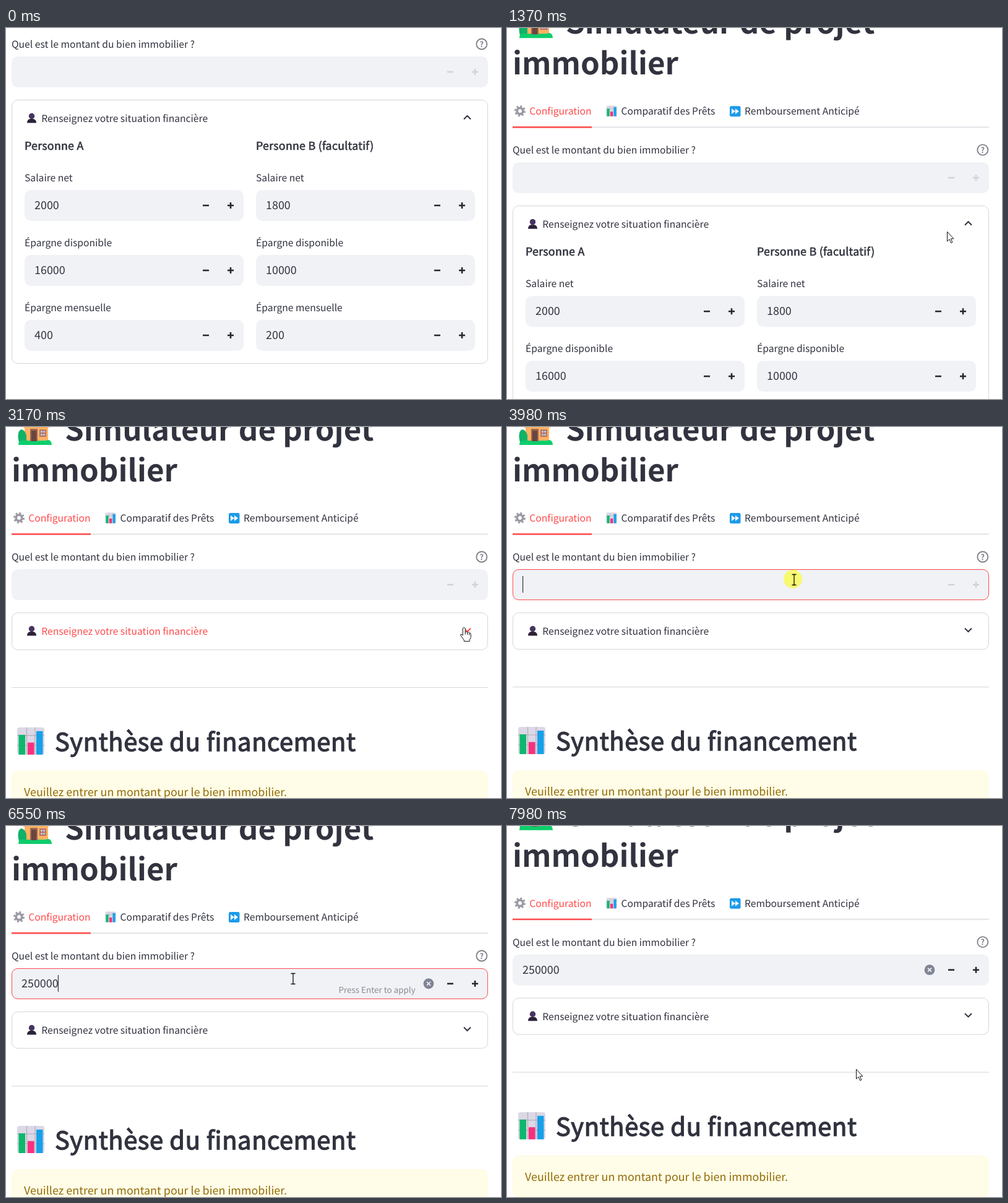
Animation of 800 by 600 pixels, one loop 8 s. Source, as an HTML page:

```html
<!DOCTYPE html>
<html lang="fr">
<head>
<meta charset="utf-8">
<title>Simulateur</title>
<style>
html, body { margin: 0; width: 100%; height: 100%; overflow: hidden; background: #fff; }
svg { display: block; width: 800px; height: 600px; }
text {
  font: 15.67px "Noto Sans CJK JP", "Noto Sans CJK SC", "Noto Sans CJK", "Noto Sans", sans-serif;
  font-variant-ligatures: none; text-rendering: geometricPrecision; fill: #31333f;
}
.h1 { font-size: 49.25px; font-weight: 700; }
/* Semibold: regular weight thickened by a thin outline */
.semi { letter-spacing: .015em; stroke: #31333f; stroke-width: .033em; }
.h2 { font-size: 39.9px; }
.h4 { font-size: 17.8px; }
.big { font-size: 17.91px; }
.hint { font-size: 13.43px; fill: #8b8c95; }
.red { fill: #ff4b4b; }
.field { fill: #f0f2f6; }
.sign { stroke: #262730; stroke-width: 2.6; }
.box { fill: none; stroke: #d6d6d9; }
.chev { fill: none; stroke: #31333f; stroke-width: 2; }
.hover text { fill: #ff4b4b; }
.hover .chev { stroke: #ff4b4b; }
</style>
</head>
<body>
<svg viewBox="0 0 800 600">
  <defs>
    <clipPath id="clip"><rect id="clipBox" x="9" y="300" width="770"/></clipPath>
    <g id="bars">
      <rect width="44" height="44" rx="4" fill="#dcd8e6"/>
      <path d="M0 13H44M0 29H44M15.5 0V44M29 0V44" stroke="#b4acbc" stroke-width="1.2"/>
      <rect x="2.5" y="12" width="10.5" height="32" fill="#0cb96c"/>
      <rect x="17" y="24.5" width="10.5" height="19.5" fill="#f8307f"/>
      <rect x="31" y="6" width="10.5" height="38" fill="#17a0e8"/>
    </g>
  </defs>
  <g id="page">
    <g id="house">
      <rect x="30" y="-8" width="38" height="33" fill="#ffb363"/>
      <path d="M26 -3L49-24L73 -3L70 1L49-17L29 1Z" fill="#d9535a"/>
      <path d="M20 20Q18 8 24 4Q30 4 33 13V25H21Z" fill="#10b268"/>
      <path d="M20 29Q20 20 31 22H64Q73 18 74 29Z" fill="#0cce6b"/>
      <rect x="39" y="3" width="12" height="20" fill="#9a6654"/>
      <rect x="41" y="6" width="8" height="17" fill="#6b443f"/>
      <rect x="54" y="4" width="11" height="12" fill="#c0705f"/>
      <path d="M56 6h3v3h-3zm4 0h3v3h-3zm-4 5h3v3h-3zm4 0h3v3h-3z" fill="#a5cbe8"/>
    </g>
    <text class="h1" x="95" y="22">Simulateur de projet</text>
    <text class="h1" x="9" y="88">immobilier</text>

    <circle cx="21" cy="147" r="7.7" fill="none" stroke="#9b9aa3" stroke-width="2.6" stroke-dasharray="3.1 2.95"/>
    <circle cx="21" cy="147" r="4.8" fill="none" stroke="#9b9aa3" stroke-width="3.8"/>
    <text class="red" x="36.3" y="153">Configuration</text>
    <use href="#bars" transform="translate(160.5 138.5) scale(.39)"/>
    <text x="184.5" y="153">Comparatif des Prêts</text>
    <rect x="360" y="139" width="17.5" height="17" rx="2.5" fill="#1c9be8"/>
    <path d="M363 143L369 147.5L363 152ZM369 143L375 147.5L369 152Z" fill="#fff"/>
    <text x="384" y="153">Remboursement Anticipé</text>
    <rect x="9" y="172" width="770" height="2.5" fill="#e7e8eb"/>
    <rect x="9" y="172" width="128" height="2.5" fill="#ff4b4b"/>

    <text x="9" y="216">Quel est le montant du bien immobilier ?</text>
    <circle cx="768.8" cy="210" r="8.5" fill="none" stroke="#7e7f88" stroke-width="1.8"/>
    <text x="768.8" y="214.8" text-anchor="middle" style="font-size:12.5px;font-weight:700;fill:#7e7f88">?</text>
    <rect class="field" x="9" y="230" width="770" height="50" rx="10"/>
    <rect id="focus" x="9.5" y="230.5" width="769" height="49" rx="9.5" fill="none" stroke="#ff4b4b"/>
    <text id="amount" class="big" x="25" y="261"></text>
    <rect id="caret" y="241" width="1.2" height="27" fill="#31333f"/>
    <text id="hint" class="hint" x="537.5" y="270">Press Enter to apply</text>
    <g id="clear">
      <circle cx="683" cy="255" r="8.4" fill="#808495"/>
      <path d="M680 252l6 6m0-6l-6 6" stroke="#f0f2f6" stroke-width="1.7"/>
    </g>
    <path id="minus" class="sign" d="M713 255h10"/>
    <path id="plus" class="sign" d="M753 255h10m-5-5v10"/>

    <g id="header">
      <circle cx="41.5" cy="326.5" r="4.7" fill="#46345f"/>
      <path d="M34 337.5Q34 332 39 331H44Q49 332 49 337.5Z" fill="#2c2138"/>
      <text x="57.3" y="336">Renseignez votre situation financière</text>
      <path id="chevron" class="chev"/>
    </g>
    <g id="details" clip-path="url(#clip)"></g>
    <rect id="frame" class="box" x="9.5" y="300.5" width="769" rx="9.5"/>

    <g id="below">
      <path class="box" d="M9 420.5H779"/>
      <use href="#bars" x="18" y="485"/>
      <text class="h2 semi" x="79" y="523">Synthèse du financement</text>
      <rect x="9" y="555" width="770" height="68" rx="10" fill="#fffce7"/>
      <text class="big" x="29" y="596" style="fill:#926c05">Veuillez entrer un montant pour le bien immobilier.</text>
    </g>
  </g>
  <circle id="halo" r="15" fill="#ff0" fill-opacity=".55"/>
  <g id="cursor" stroke="#111">
    <path id="arrow" fill="#fff" d="M.5 .5V16L4 12.7L6.6 18.6L8.9 17.6L6.4 11.8H11Z"/>
    <path id="hand" fill="#fff" d="M-2 1Q0-2 2 1V7Q4 5.5 5.5 7.5Q7.5 6.5 8.5 8.5Q11 7.5 11 10.5V16L9 20V22H0V20L-5 13Q-6.5 10-4 10.5L-2 12.5ZM2 7v4M5.5 8v3.5M8.5 9v3"/>
    <path id="beam" fill="none" stroke-width="1.3" d="M-3.5-8.5H3.5M0-8.5V8.5M-3.5 8.5H3.5"/>
  </g>
</svg>
<script>
const el = id => document.getElementById(id);
const set = (id, attrs) => { for (const k in attrs) el(id).setAttribute(k, attrs[k]); };
const show = (id, on) => el(id).setAttribute('opacity', +on);
const ramp = (t, a, b) => Math.min(1, Math.max(0, (t - a) / (b - a)));
const within = (v, a, b) => v >= a && v < b;

// Linear interpolation through [time, ...values] points
function track(t, keys) {
  let i = 0;
  while (i < keys.length - 2 && t >= keys[i + 1][0]) i++;
  const [a, b] = [keys[i], keys[i + 1]], p = ramp(t, a[0], b[0]);
  return a.slice(1).map((v, j) => v + (b[j + 1] - v) * p);
}

const labels = ['Salaire net', 'Épargne disponible', 'Épargne mensuelle'];
const people = [
  [30, 'Personne A', [2000, 16000, 400]],
  [404, 'Personne B (facultatif)', [1800, 10000, 200]]
];
el('details').innerHTML = people.map(([x, name, values]) =>
  `<text class="h4 semi" x="${x}" y="381">${name}</text>` +
  values.map((v, i) => {
    const y = 446 + 105 * i;
    return `<text x="${x}" y="${y - 14}">${labels[i]}</text>
      <rect class="field" x="${x}" y="${y}" width="354" height="50" rx="10"/>
      <text class="big" x="${x + 16}" y="${y + 31}">${v}</text>
      <path class="sign" d="M${x + 288} ${y + 25}h10m30 0h10m-5-5v10"/>`;
  }).join('')).join('');

const scroll = [[1190, -184], [1220, -150], [1290, -60], [1370, -13], [1440, 0],
  [7870, 0], [7900, -4], [7980, -22], [8000, -28]];
const path = [[640, 742, 553], [1000, 711, 329], [1440, 711, 329], [2010, 735, 262],
  [2300, 753, 333], [2820, 753, 333], [3170, 741, 325], [3400, 560, 234], [3610, 464, 247],
  [6820, 464, 247], [7120, 564, 393], [8000, 564, 393]];
const clicks = [[2620, 2820, 751, 334], [3860, 4120, 462, 246], [7340, 7530, 564, 393]];
const keyTimes = [5100, 5320, 5540, 5970, 6120, 6330];
const CLICK_IN = 3860, BLUR = 7400, COLLAPSE = 2820;

function draw(t) {
  set('page', { transform: `translate(0 ${track(t, scroll)[0]})` });

  // Expander closes with a quintic ease-out
  const open = t < COLLAPSE;
  const extra = 367 * (1 - ramp(t, COLLAPSE, COLLAPSE + 500)) ** 5;
  set('frame', { height: 59 + extra });
  set('clipBox', { height: 59 + extra });
  show('details', extra > .5);
  set('below', { transform: `translate(0 ${extra})` });
  set('chevron', { d: open ? 'M740 331.5l5.5-5.5 5.5 5.5' : 'M740 325.5l5.5 5.5 5.5-5.5' });

  // Amount field
  const typed = keyTimes.filter(k => k <= t).length;
  const focused = within(t, CLICK_IN, BLUR);
  const lastKey = typed ? keyTimes[typed - 1] : 3900;
  el('amount').textContent = '250000'.slice(0, typed);
  set('caret', { x: 25 + 9.94 * typed - (typed ? .8 : 0) });
  show('caret', focused && (t < lastKey || (t - lastKey) % 1000 < 500));
  set('focus', { opacity: ramp(t, 3800, 3980) * (1 - ramp(t, BLUR - 40, BLUR + 120)) });
  show('hint', typed && focused);
  show('clear', typed);
  set('plus', { opacity: .15 + .85 * ramp(t, 5050, 5200) });
  set('minus', { opacity: .15 + .85 * ramp(t, 6330, 6540) });

  // Pointer
  const [x, y] = track(t, path);
  const hover = t > 2010 && within(y, 300, 360);
  const text = t > 2010 && within(y, 230, 280) && x < 703;
  el('header').setAttribute('class', hover ? 'hover' : '');
  set('cursor', { transform: `translate(${x} ${y})` });
  show('cursor', t >= 640);
  show('hand', hover);
  show('beam', text);
  show('arrow', !hover && !text);
  const click = clicks.find(([a, b]) => within(t, a, b));
  show('halo', !!click);
  if (click) set('halo', { cx: click[2], cy: click[3] });
}

const start = performance.now();
function tick() {
  draw((performance.now() - start) % 8000);
  requestAnimationFrame(tick);
}
tick();
</script>
</body>
</html>
```
